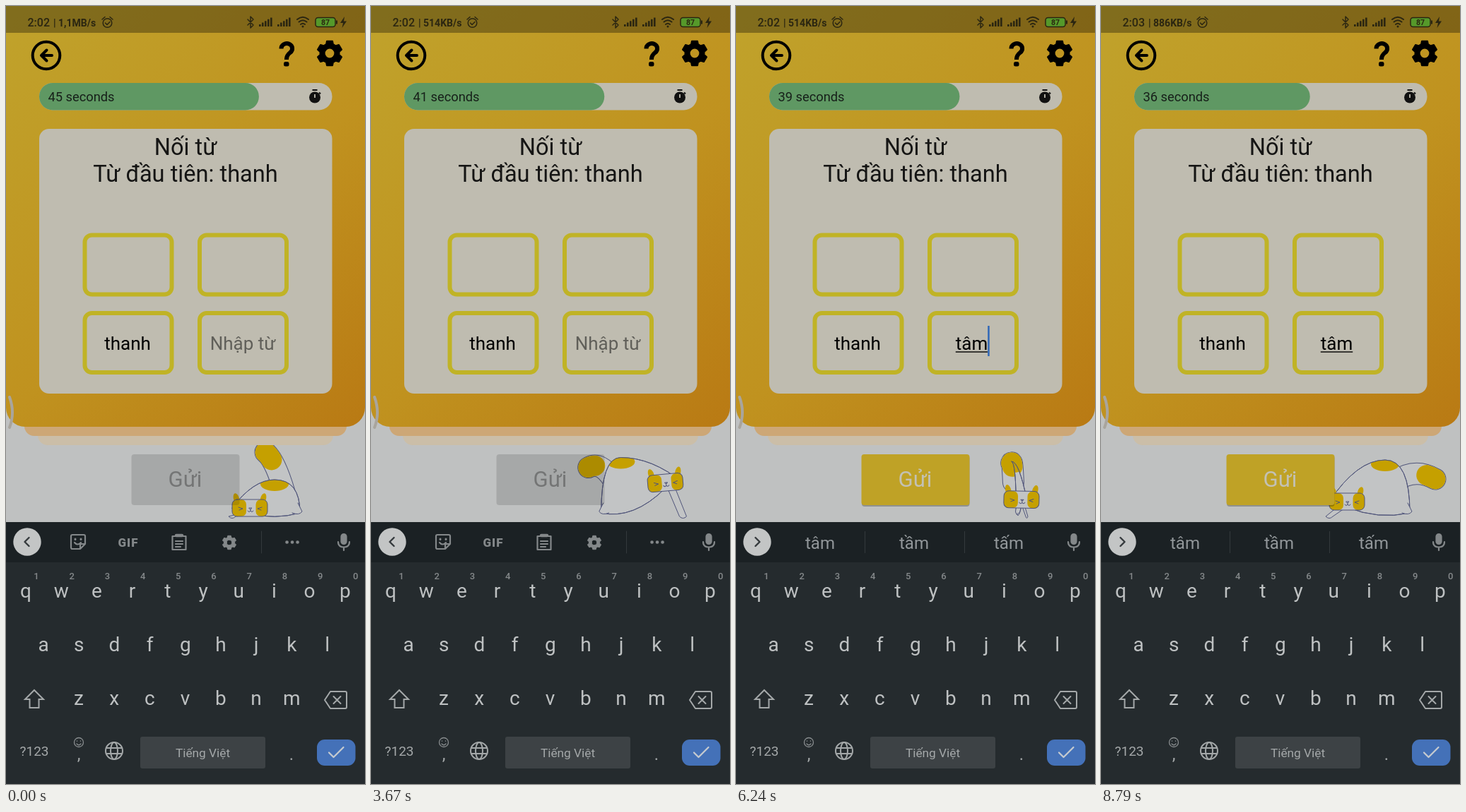
An HTML page for the animation above (8820 ms loop, 508 by 1102 pixels).

```html
<!DOCTYPE html>
<html lang="vi">
<head>
<meta charset="utf-8">
<title>Nối từ</title>
<style>
html, body { margin: 0; width: 100%; height: 100%; overflow: hidden; background: #bfc1c1; }
svg { display: block; width: 100%; height: 100%; font-family: Roboto, "Noto Sans", sans-serif; }
.mid { text-anchor: middle; }
.line { fill: none; stroke-linecap: round; stroke-linejoin: round; }
.cat { stroke: #50557a; stroke-linejoin: round; stroke-linecap: round; }
</style>
</head>
<body>
<svg viewBox="0 0 508 1102" xmlns="http://www.w3.org/2000/svg">
  <defs>
    <linearGradient id="warm" gradientUnits="userSpaceOnUse" x1="0" y1="30" x2="500" y2="596">
      <stop offset="0" stop-color="#c0a22b"/>
      <stop offset=".55" stop-color="#c0921f"/>
      <stop offset="1" stop-color="#b97a14"/>
    </linearGradient>
    <clipPath id="floor"><rect y="622" width="508" height="108"/></clipPath>
  </defs>
  <rect width="508" height="1102" fill="#bfc1c1"/>

  <!-- stacked sheets -->
  <rect x="45" y="580" width="418" height="42" rx="14" fill="#cbbea8"/>
  <rect x="26" y="570" width="456" height="39" rx="14" fill="#cda776"/>
  <rect y="-40" width="508" height="636" rx="27" fill="url(#warm)"/>
  <rect width="508" height="38" opacity=".33"/>
  <path d="M5 554Q13 576 5 597" class="line" stroke="#a9a59d" stroke-width="4"/>

  <!-- status bar -->
  <g fill="#2b2611">
    <text id="clock" x="30.5" y="29" font-size="16" font-weight="500"></text>
    <text id="speed" x="67" y="28.5" font-size="14" font-weight="600"></text>
    <g class="line" stroke="#2b2611" stroke-width="1.5">
      <circle cx="143.5" cy="24" r="6.3"/>
      <path d="M140.5 24l2.5 2.5 4-4M136 19l4-3.5M151 19l-4-3.5"/>
      <path d="M342 19l8 8-4 4V15l4 4-8 8"/>
      <path d="M412 19q8-6.5 16 0M414.5 22.5q5.5-4.5 11 0M417 26q3-2.5 6 0" stroke-width="2"/>
    </g>
    <circle cx="420" cy="29" r="1.5"/>
    <path id="bars"/>
    <rect x="438" y="16.5" width="28" height="13" rx="3.5" fill="#55992a" stroke="#2b2611" stroke-width="1.5"/>
    <rect x="467" y="20.5" width="2" height="5"/>
    <text x="452" y="27" font-size="10.5" font-weight="600" class="mid">87</text>
    <path d="M479 15l-6 9h4l-1.5 7 6.5-9.5h-4z"/>
  </g>

  <!-- header -->
  <circle cx="57" cy="70" r="19.3" class="line" stroke="#000" stroke-width="4"/>
  <path d="M65 70H51M57.500 62.500l-7.500 7.500 7.500 7.500" class="line" stroke="#000" stroke-width="4"/>
  <path d="M389.500 60.500a7.800 7.200 0 1 1 12.500 5.500q-5 4-5 9v1" fill="none" stroke="#000" stroke-width="6"/>
  <rect x="393" y="79" width="7.500" height="6.500" rx="2.500"/>
  <path id="bigGear" fill-rule="evenodd" stroke="#000" stroke-width="2" stroke-linejoin="round"/>

  <!-- countdown -->
  <rect x="47" y="109" width="414.5" height="38.5" rx="19" fill="#bfbcb0"/>
  <rect id="fill" x="47" y="109" height="38.5" rx="19" fill="#5f9863"/>
  <text id="left" x="59.5" y="135" font-size="18.3" fill="#17201a"></text>
  <g stroke="#111" stroke-width="2.2">
    <circle cx="437" cy="129.5" r="8" fill="#111" stroke="none"/>
    <path d="M433.5 119h7M443 122.5l2 2"/>
    <path d="M437 125v5" stroke="#bfbcb0" stroke-width="1.8"/>
  </g>

  <!-- card -->
  <rect x="47" y="174" width="414.5" height="375" rx="14" fill="#bfbcb0"/>
  <g font-size="32.6" class="mid" fill="#151514">
    <text x="254" y="211">Nối từ</text>
    <text x="254" y="249">Từ đầu tiên: thanh</text>
  </g>
  <g id="boxes" fill="none" stroke="#c0b326" stroke-width="6"></g>
  <g font-size="26" class="mid">
    <text x="172" y="486.5">thanh</text>
    <text id="hint" x="335" y="486.5" fill="#605f59">Nhập từ</text>
    <text id="word" x="333.5" y="486.5"></text>
  </g>
  <rect id="under" y="489.3" height="1.4"/>
  <rect id="caret" y="453" width="2.5" height="43" fill="#2f67b8"/>

  <g clip-path="url(#floor)"><g id="cat" class="cat"></g></g>

  <!-- send button -->
  <rect id="shade" x="178" y="637" width="152.5" height="72" rx="4" opacity=".25"/>
  <rect id="send" x="177.5" y="635" width="153" height="72" rx="4"/>
  <text id="sendText" x="253.5" y="681" font-size="31" class="mid">Gửi</text>

  <!-- keyboard -->
  <rect y="731" width="508" height="371" fill="#252b2e"/>
  <rect y="731" width="508" height="57" fill="#1b2124"/>
  <circle cx="30" cy="759" r="19.7" fill="#c3c5c5"/>
  <path id="chevron" class="line" stroke="#34393c" stroke-width="2.3"/>
  <g id="tools" class="line" stroke="#84888a" stroke-width="2.2">
    <path d="M94 749H110Q112 749 112 751V762L105 769H94Q92 769 92 767V751Q92 749 94 749ZM112 762H107Q105 762 105 764V769M97 760q4 5 9 0"/>
    <path d="M98 755v.5M106 755v.5" stroke-width="3"/>
    <path d="M235.5 751H254.5V770H235.5ZM240 758H250M240 762H250M240 766H247"/>
    <path d="M241 750h8" stroke-width="4.5"/>
    <path id="smallGear" fill="#84888a" fill-rule="evenodd" stroke-width="1"/>
    <path d="M361.5 744V775" stroke="#33393c" stroke-width="1"/>
    <path d="M397.5 759.5h.1M405 759.5h.1M412.5 759.5h.1" stroke-width="4.6"/>
    <text x="173" y="765.5" font-size="17" font-weight="900" letter-spacing="1" class="mid" fill="#84888a" stroke="none">GIF</text>
  </g>
  <g id="tips" font-size="24" class="mid" fill="#92979a">
    <text x="119" y="768.5"></text><text x="252" y="768.5"></text><text x="386" y="768.5"></text>
    <path d="M182.5 744V775M323.5 744V775" stroke="#33393c"/>
  </g>
  <g class="line" stroke="#84888a" stroke-width="2.2">
    <rect x="474.5" y="748" width="7" height="14" rx="3.5" fill="#84888a"/>
    <path d="M470 759q0 7.5 8 7.5t8-7.5M478 767v4"/>
  </g>
  <g id="keys" font-size="28" class="mid" fill="#bec1c2"></g>
  <g class="line" stroke="#a4a8a9" stroke-width="2">
    <path d="M40 969L53 982H46.5V994H33.5V982H27Z" stroke-linejoin="miter"/>
    <path d="M459 971H480Q482 971 482 973V993Q482 995 480 995H459L451 983ZM463.5 978l10 10M473.5 978l-10 10"/>
    <circle cx="153" cy="1055" r="12"/>
    <ellipse cx="153" cy="1055" rx="5" ry="12"/>
    <path d="M142 1051H164M142 1059H164"/>
    <g stroke="#898d8f" stroke-width="1.3">
      <circle cx="103" cy="1043" r="6.5"/><path d="M100 1045q3 3.5 6 0M100.5 1041v.3M105.5 1041v.3"/>
    </g>
  </g>
  <g class="mid" fill="#a4a8a9">
    <text x="40" y="1062" font-size="19">?123</text>
    <text x="103" y="1068" font-size="24">,</text>
    <text x="404" y="1068" font-size="24">.</text>
    <rect x="190" y="1035" width="177" height="45" rx="3" fill="#3d4245"/>
    <text x="278.5" y="1064" font-size="17.3">Tiếng Việt</text>
  </g>
  <rect x="440" y="1039" width="54.5" height="37" rx="11" fill="#4471b8"/>
  <path d="M457 1057.500l6.500 6.500 14-14" class="line" stroke="#c6cbd0" stroke-width="2.2"/>
</svg>

<script>
const $ = id => document.getElementById(id);
const LOOP = 8820;

function gear(cx, cy, r, hole) {
  const at = (rad, deg) => {
    const a = deg * Math.PI / 180;
    return [cx + rad * Math.cos(a), cy + rad * Math.sin(a)].map(v => v.toFixed(1));
  };
  const pts = [];
  for (let a = -90; a < 270; a += 60)
    pts.push(at(r * .77, a - 21), at(r, a - 13), at(r, a + 13), at(r * .77, a + 21));
  return `M${pts.join('L')}ZM${cx - hole} ${cy}a${hole} ${hole} 0 1 0 ${2 * hole} 0a${hole} ${hole} 0 1 0 ${-2 * hole} 0Z`;
}
$('bigGear').setAttribute('d', gear(458, 67, 17.8, 7.4));
$('smallGear').setAttribute('d', gear(316, 760, 10, 3.8));

let bars = '', boxes = '';
for (const x of [358, 384])
  for (let i = 0; i < 5; i++) bars += `M${x + i * 4} 29v${-3 - i * 2.4}h2.6v${3 + i * 2.4}z`;
for (const x of [111.5, 274])
  for (const y of [324.5, 435]) boxes += `<rect x="${x}" y="${y}" width="123" height="84" rx="10"/>`;
$('bars').setAttribute('d', bars);
$('boxes').innerHTML = boxes;

const row = (letters, x, y) => [...letters].map((c, i) => `<text x="${x + i * 50.2}" y="${y}">${c}</text>`).join('');
$('keys').innerHTML = row('qwertyuiop', 28, 838) + row('asdfghjkl', 53, 914) + row('zxcvbnm', 103, 990) +
  `<g font-size="13" font-weight="500" fill="#85898b">${row('1234567890', 43, 812)}</g>`;

// Last entry whose start time has passed
const pick = (t, list) => list.filter(e => e[0] <= t).pop();
const CLOCK = [[0, '2:02'], [7900, '2:03']];
const SPEED = [[0, '| 1,1MB/s'], [3400, '| 514KB/s'], [7400, '| 886KB/s']];
const TYPED = [
  [0, '', []],
  [3850, 't', ['t', 'tôi', 'thì']],
  [4050, 'ta', ['ta', 'tao', 'tạ']],
  [4300, 'tâ', ['tâ', 'ta', 'tạ']],
  [6150, 'tâm', ['tâm', 'tầm', 'tấm']]
];

// The cat hangs on four joints; every outline is derived from them
const joints = (at, back, foot, head, tail) => ({ at, pts: [...back, foot, ...head, ...tail] });
const POSES = [
  joints(550, [380, 671], 416, [345, 711, 0], [367, 632]),
  joints(1760, [326, 596], 367, [342, 683, -15], [295, 604]),
  joints(2760, [372, 642], 340, [414, 649, 3], [322, 643]),
  joints(4420, [342, 638], 317, [418, 691, -10], [299, 660]),
  joints(5520, [342, 640], 315, [425, 695, 5], [312, 610]),
  joints(7000, [444, 651], 489, [380, 704, -3], [478, 690]),
  joints(8790, [402, 643], 437, [348, 702, 0], [473, 670])
];
const WHITE = '#c2c4c5', GOLD = '#c5a000', GROUND = 718;

const clamp = (v, lo, hi) => Math.min(hi, Math.max(lo, v));
const smooth = u => u * u * (3 - 2 * u);
const bump = (t, peak, width) => Math.exp(-(((t - peak) / width) ** 2));

function poseAt(t) {
  const i = POSES.findIndex(p => t < p.at);
  if (i < 1) return POSES[i < 0 ? POSES.length - 1 : 0].pts;
  const a = POSES[i - 1], b = POSES[i];
  const u = (t - a.at) / (b.at - a.at);
  const k = smooth(clamp((u - .2) / .6, 0, 1));
  return a.pts.map((v, j) => v + (b.pts[j] - v) * k);
}

function head(x, y, tilt, h, outlined) {
  const w = 50, l = -w / 2, top = -h / 2;
  const box = (bx, bw, fill, stroke) =>
    `<rect x="${bx}" y="${top}" width="${bw}" height="${h}" rx="7" fill="${fill}" stroke="${stroke}"/>`;
  const ear = side => `<ellipse rx="4" ry="8" fill="${GOLD}" stroke="none"
    transform="translate(${side * (w / 2 - 6)} ${top - 1}) rotate(${side * 15})"/>`;
  return `<g transform="translate(${x} ${y}) rotate(${tilt})">${ear(-1)}${ear(1)}
    ${box(l, w, WHITE, 'none')}${box(l, w * .4, GOLD, 'none')}${box(w * .17, w * .33, GOLD, 'none')}
    ${outlined ? box(l, w, 'none', '') : ''}
    <path d="M${l + 9} -1l6 2-5 2M${-l - 8} -1l-6 2 5 2M-1 0h4l-2 2zM1 2v2M-3 4q2 3 4 0q2 3 4 0" fill="none"/></g>`;
}

function drawCat(t) {
  const [bx, by, fx, hx, hy, tilt, tx, ty] = poseAt(t);
  const hop = bump(t, 1760, 350), shake = bump(t, 2760, 300);
  const fy = GROUND - 40 * hop;
  const dir = clamp((fx - hx) / 25, -1, 1);
  const nose = hx - 25 * dir, paw = hx - 30 * dir;

  const rx = bx + (fx - bx) * .4, ry = by + (fy - by) * .4;
  const tail = `M${tx} ${ty}Q${(rx + tx) / 2} ${(ry + ty) / 2 - 18} ${rx} ${ry}`;
  const stroke = (color, width, dash = '') =>
    `<path d="${tail}" pathLength="100" fill="none" stroke="${color}" stroke-width="${width}" stroke-dasharray="${dash}"/>`;

  const body = `M${nose} ${hy}Q${(nose + bx) / 2} ${by} ${bx} ${by}Q${fx} ${by} ${fx} ${fy}
    Q${(fx + hx) / 2} ${fy + 10} ${hx} ${hy + 8}Z`;
  const legs = `M${hx - 14 * dir} ${hy + 8}L${paw} ${GROUND + 5}q${5 * dir} 5 ${10 * dir} 0L${hx - 4 * dir} ${hy + 10}
    M${fx - 3 * dir} ${fy - 14}L${fx + 3 * dir} ${fy - 2}q${-4 * dir} 6 ${-14 * dir} 2`;

  let heads = '';
  for (let i = shake > .05 ? 3 : 0; i >= 0; i--)
    heads += head(hx - 2 * i * shake, hy + 15 * i * shake, tilt + 5 * i * shake, 24 + 8 * hop + 4 * shake, shake < .3);

  $('cat').innerHTML = `${stroke('#50557a', 31)}${stroke(WHITE, 29)}${stroke(GOLD, 29, '22 200')}
    <clipPath id="torso"><path d="${body}"/></clipPath>
    <path d="${body}" fill="${WHITE}"/>
    <ellipse cx="${bx}" cy="${by + 6}" rx="20" ry="10" fill="${GOLD}" stroke="none" clip-path="url(#torso)"/>
    <path d="${body}" fill="none"/><path d="${legs}" fill="${WHITE}"/>${heads}`;
}

const show = (id, on) => $(id).setAttribute('visibility', on ? 'visible' : 'hidden');

function draw(t) {
  $('clock').textContent = pick(t, CLOCK)[1];
  $('speed').textContent = pick(t, SPEED)[1];

  const secs = 45 - Math.floor((t + 380) / 1000);
  $('left').textContent = secs + ' seconds';
  $('fill').setAttribute('width', 414.5 * secs / 60);

  const [since, text, tips] = pick(t, TYPED);
  const typing = text !== '';
  $('word').textContent = text;
  show('hint', !typing);
  show('tools', !typing);
  show('tips', typing);
  document.querySelectorAll('#tips text').forEach((el, i) => el.textContent = tips[i] || '');
  $('chevron').setAttribute('d', typing ? 'M27.5 753l6 6-6 6' : 'M32.5 753l-6 6 6 6');

  const width = typing ? $('word').getComputedTextLength() : 0;
  $('under').setAttribute('x', 333.5 - width / 2);
  $('under').setAttribute('width', width);
  $('caret').setAttribute('x', 333.5 + width / 2);
  show('caret', typing && (t - since) % 1000 < 500);

  const ready = t >= 4800;
  show('shade', ready);
  $('send').setAttribute('fill', ready ? '#bfa226' : 'rgba(0,0,0,.13)');
  $('sendText').setAttribute('fill', ready ? '#c3c1b4' : '#747575');

  drawCat(t);
}

const start = performance.now();
function tick() {
  draw((performance.now() - start) % LOOP);
  requestAnimationFrame(tick);
}
tick();
</script>
</body>
</html>
```
